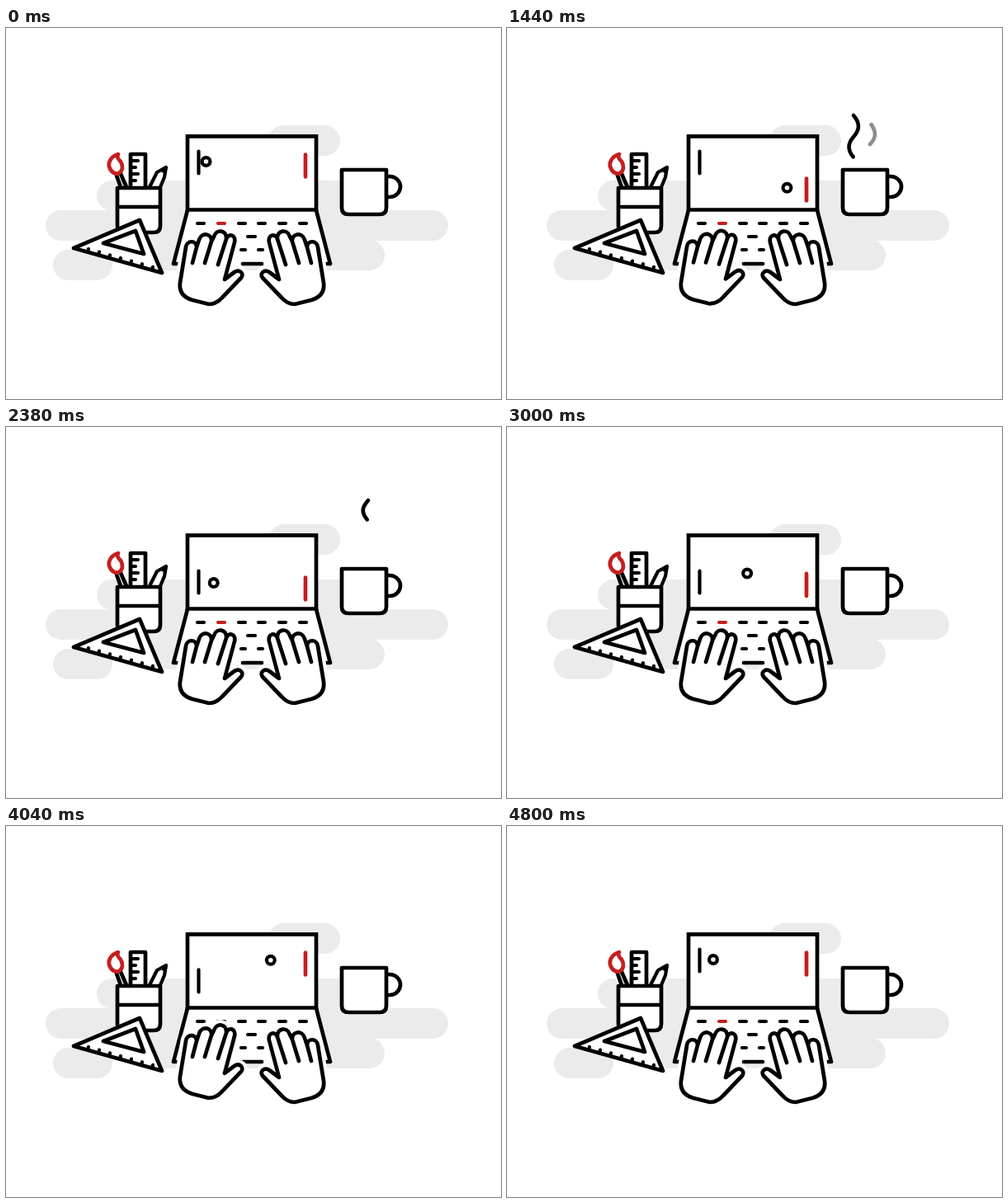
An HTML page for the animation above (4880 ms loop, 600 by 450 pixels).

```html
<!DOCTYPE html>
<html lang="en">
<head>
<meta charset="utf-8">
<title>Desk</title>
<style>
  html, body { margin: 0; width: 100%; height: 100%; overflow: hidden; background: #fff; }
  svg { display: block; width: 600px; height: 450px; }
  .ink { fill: #fff; stroke: #000; stroke-width: 4.7; stroke-linecap: round; stroke-linejoin: round; }
  .thin { stroke-width: 4.2; }
  .line { fill: none; }
  .red { stroke: #c4201f; }
  .halo { fill: #fff; stroke: #fff; stroke-width: 13; stroke-linejoin: round; }
</style>
</head>
<body>
<svg viewBox="0 0 600 450">
  <defs>
    <path id="hand" d="M211 309L218 266C219 257 231 257 231 266L226 285L231 266L234 257C237 247 250 249 249 259
      L241 285L249 259L252 253C255 243 268 245 267 256L257 287L267 256C270 248 279 251 277 260L265 305L277 296
      C283 292 289 298 285 303L262 327Q255 335 246 335L226 330Q209 325 211 309Z"/>
  </defs>

  <g fill="#ebebeb">
    <rect x="318" y="118" width="87" height="37" rx="18.5"/>
    <rect x="110" y="185" width="351" height="37" rx="18.5"/>
    <rect x="48" y="221" width="488" height="37" rx="18.5"/>
    <rect x="57" y="269" width="72" height="37" rx="18.5"/>
    <rect x="150" y="257" width="309" height="37" rx="18.5"/>
  </g>

  <g class="ink">
    <path d="M134 179L139 193M139 177L146 193"/>
    <path class="red" d="M136 153C126 156 124 164 125 168C127 175 133 178 137 176C142 173 142 167 139 162C136 159 134 157 136 153Z"/>
    <path d="M151 193V153H169V193"/>
    <path class="thin" d="M152 161H160M152 169H157M152 177H160M152 185H157"/>
    <path class="thin" d="M174 193L183 175L194 169L192 181L187 193"/>
    <path class="thin" d="M189 172L193.5 169.5L192.5 175Z" style="fill:#000"/>
    <path d="M135 194H187V240Q187 248 179 248H143Q135 248 135 240ZM135 217H187"/>
    <path d="M82 267L162 233L189 297Z"/>
    <path d="M118 261L157 246L167 274Z"/>
    <path id="ticks" class="thin"/>

    <path class="line" d="M461 180h4a13 12.5 0 0 1 0 25h-4"/>
    <path d="M407 172H461V218Q461 226 453 226H415Q407 226 407 218Z"/>

    <path stroke="none" d="M220 221H376L393 288H203Z"/>
    <path class="line" d="M220 221L203 286H209M376 221L393 286H388M287 286H310"/>
    <path d="M220 131.3H376V220.5H220Z" stroke-linejoin="miter"/>
    <path class="thin" d="M232 237h8M282 237h8M306 237h8M331 237h8M356 237h8M293 253h9M285 269h5M306 269h5"/>
    <path id="key" class="thin red" d="M257 237h8"/>

    <path id="left" class="thin" d="M233.5 149.5v27"/>
    <path id="right" class="red" d="M363 153.5v27"/>
    <circle id="ball" class="thin" r="4.9"/>

    <path id="steam1" class="line" pathLength="100" d="M421 158C412 148 413 140 420 132C428 123 428 115 420 106"/>
    <path id="steam2" class="line" pathLength="100" d="M440 141C449 132 447 124 440 115C431 105 430 99 439 89"/>
  </g>

  <g id="leftHand"><use href="#hand" class="halo"/><use href="#hand" class="ink"/></g>
  <g transform="matrix(-1 0 0 1 596 0)"><use href="#hand" class="halo"/><use href="#hand" class="ink"/></g>
</svg>
<script>
const LOOP = 4880, LAST = 4800, START = 80, CROSSING = 1200;
const BALL_Y = [162, 194.5, 188.5, 163, 162];
const $ = id => document.getElementById(id);
const shift = (id, x, y) => $(id).setAttribute('transform', `translate(${x} ${y})`);

// Smooth 0..1 progress between two times
function ease(t, from, to) {
  const p = Math.min(1, Math.max(0, (t - from) / (to - from)));
  return p * p * (3 - 2 * p);
}

function steam(id, t, headFrom, headTo, tailFrom, tailTo) {
  const head = ease(t, headFrom, headTo), tail = ease(t, tailFrom, tailTo);
  const path = $(id);
  path.style.opacity = head > tail ? head : 0;
  path.style.strokeDasharray = `${(head - tail) * 100} 300`;
  path.style.strokeDashoffset = -tail * 100;
}

const handLift = t => ease(t, 1400, 1600) - ease(t, 1610, 1960);

function draw(t) {
  const u = Math.max(0, t - START) / CROSSING;
  const leg = Math.min(3, Math.floor(u)), p = u - leg;
  shift('ball', 242.5 + 112 * (leg % 2 ? 1 - p : p), BALL_Y[leg] + (BALL_Y[leg + 1] - BALL_Y[leg]) * p);

  shift('right', 0, 29 * (ease(t, 410, 1170) - ease(t, 2810, 3570)));
  shift('left', 0, 25 * (ease(t, 1610, 2370) - ease(t, 4010, 4770)));

  const lift = handLift(t) + handLift(t - 2400);
  shift('leftHand', 0, -5.2 * lift);
  $('key').classList.toggle('red', lift < 0.2);

  steam('steam1', t, 420, 1350, 1350, 2150);
  steam('steam2', t, 600, 2400, 1900, 2800);
}

$('ticks').setAttribute('d', Array.from({ length: 7 }, (_, i) =>
  `M${99 + i * 13} ${271.5 + i * 3.64}l1 -3.5`).join(''));

function frame(now) {
  draw(Math.min(now % LOOP, LAST));
  requestAnimationFrame(frame);
}
draw(0);
requestAnimationFrame(frame);
</script>
</body>
</html>
```
